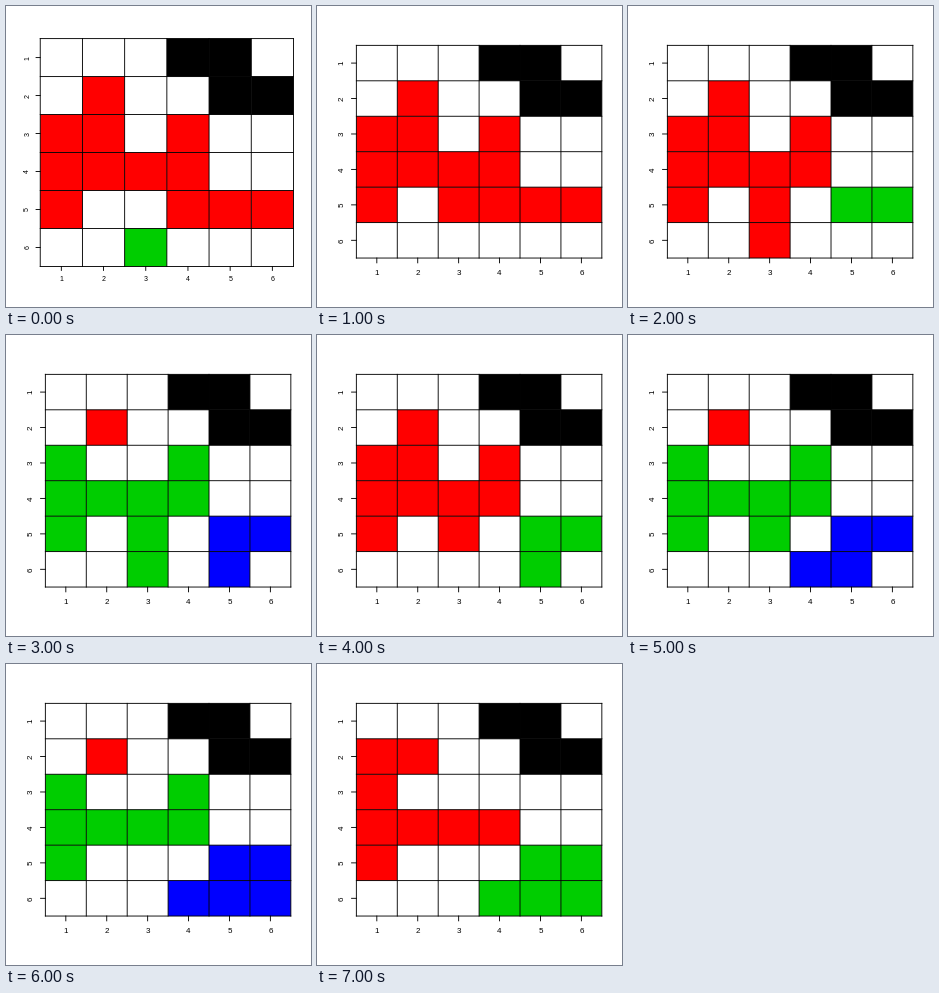
A matplotlib script for the animation above (8 s loop, 305x301 px).

```python
import matplotlib.pyplot as plt
from matplotlib.animation import FuncAnimation
from matplotlib.patches import Rectangle

W, H, DPI = 305, 301, 64
PX = 72 / DPI  # points per pixel
N, STEPS = 6, 8
COLORS = ["black", "#ff0000", "#00cd00", "#0000ff", "#00ffff"]

# Cells that stay: a stair, a column, a bar, a pair and a single cell.
FIXED = {(r, c) for r in (1, 2) for c in (r + 3, r + 4)}
FIXED |= {(r, 1) for r in range(3, 6)} | {(4, c) for c in range(1, 5)}
FIXED |= {(5, 5), (5, 6), (2, 2)}

# Cells that hop: step -> (row, column) from that step on.
HOPPERS = [{0: (6, 3), 1: (5, 3), 6: (6, 6)},
           {0: (5, 4), 2: (6, 3), 4: (3, 2), 5: (6, 4)},
           {0: (3, 2), 3: (6, 5)},
           {0: (3, 4), 7: (2, 1)}]


def cells_at(step):
    return FIXED | {path[max(s for s in path if s <= step)]
                    for path in HOPPERS}


def clusters(cells):
    """Number the connected groups in reading order."""
    labels, count = {}, 0
    for cell in sorted(cells):
        if cell in labels:
            continue
        stack = [cell]
        while stack:
            r, c = stack.pop()
            if (r, c) in cells and (r, c) not in labels:
                labels[r, c] = count
                stack += [(r + 1, c), (r - 1, c), (r, c + 1), (r, c - 1)]
        count += 1
    return labels


fig = plt.figure(figsize=(W / DPI, H / DPI), dpi=DPI, facecolor="white")
ax = fig.add_axes([0, 0, 1, 1])


def line(x0, y0, x1, y1):
    ax.plot([x0, x1], [y0, y1], color="black", lw=0.9 * PX,
            solid_capstyle="projecting", snap=False)


def label(x, y, text, size, angle=0):
    ax.text(x, y, text, fontsize=size * PX, family="Liberation Sans",
            ha="center", va="center", rotation=angle, color="black")


def draw(step):
    ax.clear()
    ax.set_xlim(0, W)
    ax.set_ylim(H, 0)
    ax.axis("off")

    # Margins, ticks and labels are all measured in text lines.
    lx, ly = (9.6, 9.6) if step else (8.35, 7.95)
    left, right = 4.1 * lx, W - 2.1 * lx
    top, bottom = 4.1 * ly, H - 5.1 * ly
    dx, dy = (right - left) / N, (bottom - top) / N

    for (r, c), group in clusters(cells_at(step)).items():
        ax.add_patch(Rectangle((left + (c - 1) * dx, top + (r - 1) * dy),
                               dx, dy, facecolor=COLORS[group], lw=0,
                               snap=False))
    for i in range(N + 1):
        x, y = left + i * dx, top + i * dy
        line(x, top, x, bottom)
        line(left, y, right, y)
    for i in range(N):
        x, y = left + (i + 0.5) * dx, top + (i + 0.5) * dy
        line(x, bottom, x, bottom + ly / 2)
        line(left - lx / 2, y, left, y)
        label(x, bottom + 1.58 * ly, str(i + 1), lx / 1.2)
        label(left - 1.5 * lx, y, str(i + 1), lx / 1.2, 90)
    return []


anim = FuncAnimation(fig, draw, frames=STEPS, init_func=lambda: [],
                     interval=1000, repeat=True, blit=False)
plt.show()
```
